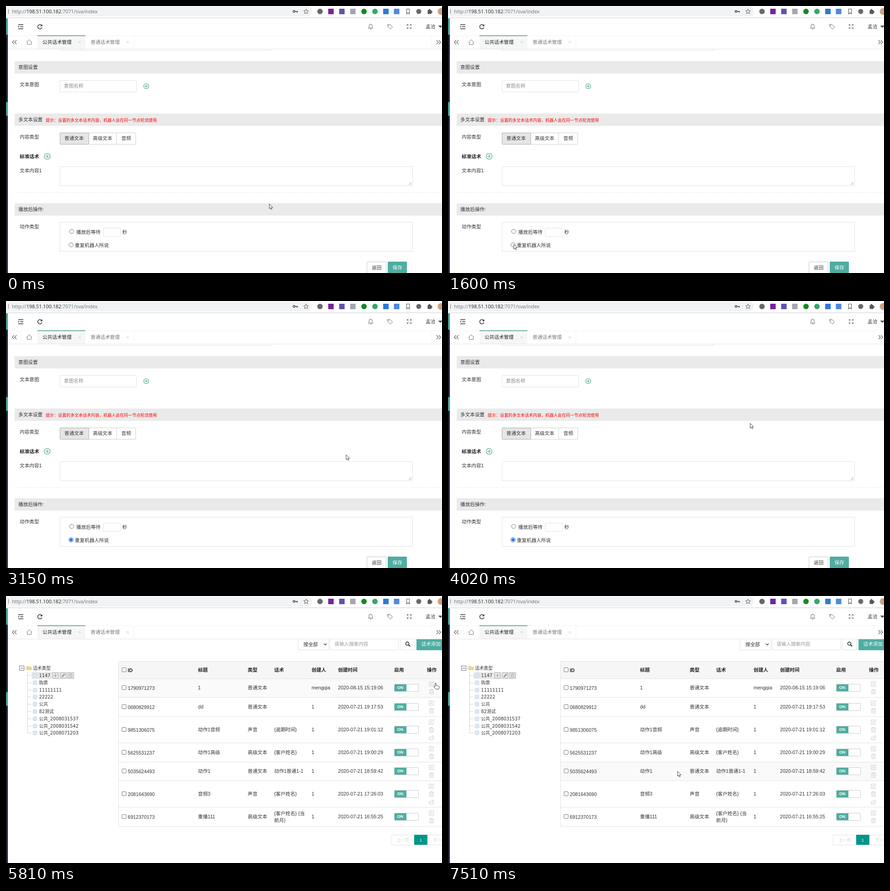
Write an HTML page that moves like this. It is 956 by 586 pixels and loops after 8000 ms.

```html
<!DOCTYPE html>
<html lang="zh-CN">
<head>
<meta charset="utf-8">
<style>
html, body { margin: 0; width: 100%; height: 100%; overflow: hidden; background: #fff; }
svg { display: block; }
text { font: 10.65px "Liberation Sans", "Noto Sans CJK SC", "Noto Sans CJK", sans-serif; white-space: pre; }
.url { font: 10.8px "Open Sans", sans-serif; }
.tree { font: 9.75px "DejaVu Sans", "Noto Sans CJK SC", "Noto Sans CJK", sans-serif; }
.small { font-size: 9.04px; }
.bold { font-weight: 700; }
</style>
</head>
<body>
<svg id="stage" width="956" height="586" viewBox="0 0 956 586"></svg>
<script>
const TEAL = '#4fada2', DARK = '#333', LINE = '#e2e2e2';

const rect = (x, y, w, h, fill = 'none', stroke = 'none', rx = 0) =>
  `<rect x="${x}" y="${y}" width="${w}" height="${h}" fill="${fill}" stroke="${stroke}" rx="${rx}"/>`;
// Outlined box aligned to whole pixels
const box = (x, y, w, h, stroke = LINE, fill = '#fff', rx = 1.5) =>
  rect(x + .5, y + .5, w - 1, h - 1, fill, stroke, rx);
const path = (d, stroke = DARK, width = 1, fill = 'none') =>
  `<path d="${d}" stroke="${stroke}" stroke-width="${width}" fill="${fill}"/>`;
const dots = d => `<path d="${d}" stroke="#aaa" stroke-dasharray="1 1"/>`;
const circle = (x, y, r, fill, stroke = 'none', width = 1) =>
  `<circle cx="${x}" cy="${y}" r="${r}" fill="${fill}" stroke="${stroke}" stroke-width="${width}"/>`;
// y is the middle of the line of text; baselines sit on whole pixels
const text = (x, y, s, fill = DARK, cls = '', anchor = 'start') =>
  `<text x="${x}" y="${Math.round(y + 4)}" fill="${fill}" class="${cls}" text-anchor="${anchor}">${s}</text>`;
const at = (x, y, s) => `<g transform="translate(${x} ${y})">${s}</g>`;
const group = (id, s) => `<g id="${id}">${s}</g>`;
const plus = (x, y, r) => circle(x, y, r, '#fff', '#3f9c90', 1.1) +
  path(`M${x - r * .6} ${y}h${r * 1.2}M${x} ${y - r * .6}v${r * 1.2}`, '#3f9c90', 1.1);
const cross = x => path(`M${x - 2.5} 77l5 5m0-5l-5 5`, '#c4c4c4', .9);

function browserBar() {
  const square = (x, fill) => rect(x - 6, 6, 12, 12, fill);
  return rect(0, 0, 956, 27, '#fff') + rect(-20, 1, 691, 22, '#f1f3f4', 'none', 11) +
    rect(0, 25, 956, 1, '#d9dbdd') + rect(0, 26, 956, 1, '#eee') + path('M5.5 7v10', '#777') +
    `<text x="13" y="16" class="url" fill="#6b7075">http://<tspan fill="#222">198.51.100.182</tspan>:7071/sva/index</text>` +
    circle(631.5, 11.8, 2, 'none', '#55595e', 1.7) + path('M634 11.8h6M638.3 12v2.6', '#55595e', 1.8) +
    path('M658 6.7l1.5 3.5 3.8.3-2.9 2.5.9 3.7-3.3-2-3.3 2 .9-3.7-2.9-2.5 3.8-.3z', '#55595e') +
    circle(688.5, 12, 6, '#666a6e') + square(712.5, '#7a1fa0') + square(736.5, '#6650b0') +
    square(760.5, '#a5a8ab') + circle(785, 12, 6, '#128a22') + circle(809, 12, 6, '#35a66a') +
    square(833, '#2b7bd8') + square(856.5, '#5088dc') +
    path('M878.5 6.5h6v11l-3-2.6-3 2.6z', '#55595e', 1.2) + circle(905, 12, 5.5, '#66696d') +
    rect(924.5, 9, 8.5, 8.5, '#55595e', 'none', 1) + circle(928.5, 8.5, 2, '#55595e') +
    circle(933, 13, 2, '#55595e') + circle(954, 12, 7.5, '#d0a27c');
}

function header() {
  const grey = '#666';
  return rect(0, 27, 956, 68, '#fff') + browserBar() +
    path('M27 41h11M31 45.5h7M27 50h11', DARK, 1.4) + path('M27 43.5v4l2.4-2z', 'none', 0, DARK) +
    path('M78.3 43a4.7 4.7 0 1 0 .5 4', DARK, 1.5) + path('M79.6 40v4.5h-4.5z', 'none', 0, DARK) +
    path('M794.5 48.5h10l-1.5-2v-3a3.5 3.5 0 0 0-7 0v3zM798 50.5h3.5M799.5 39v1', grey) +
    path('M836.5 40.5l5-.3 6 6-4.6 4.6-6-6z', grey) + circle(839.3, 43, .9, grey) +
    path('M879.5 43.5v-3h3M885.5 40.5h3v3M888.5 46.5v3h-3M882.5 49.5h-3v-3M880 41l2.8 2.8M888 41l-2.8 2.8M888 49l-2.8-2.8M880 49l2.8-2.8', grey) +
    text(920, 45, '孟洽') + path('M947.5 43h10l-5 5z', 'none', 0, '#555') +
    rect(0, 65, 956, 1, '#f4f4f4') +
    path('M18 75l-4 4.5 4 4.5M23 75l-4 4.5 4 4.5M944 75l4 4.5-4 4.5M949 75l4 4.5-4 4.5', DARK, 1.1) +
    path('M45 79.5l6-5.5 6 5.5M46.7 78.5v6h8.6v-6', '#777') +
    rect(33, 66, 1, 28, '#f3f3f3') + rect(280, 66, 1, 28, '#f3f3f3') + rect(933, 66, 1, 28, '#f3f3f3') +
    rect(69, 65, 105, 29, '#f6f6f6') + rect(69, 64.5, 105, 1.5, '#4a968d') +
    text(80, 79, '公共话术管理', '#222') + cross(161.5) +
    text(185.5, 79, '普通话术管理', '#777') + cross(267) + rect(0, 94, 956, 1, '#e4e4e4') +
    rect(0, 27, 4, 559, '#1e2029') + rect(0, 27, 4, 36, '#489d92') + rect(0, 211, 4, 30, '#489d92');
}

function form() {
  const bar = (y, s) => rect(19, y, 937, 27, '#eaeaea') + text(27, y + 13.4, s);
  return rect(0, 95, 956, 491, '#fff') + box(118, 80, 465, 18) +
    bar(121, '意图设置') + text(30, 172, '文本意图') + box(118, 163, 169, 26) +
    text(127, 175, '意图名称', '#8c8c8c') + plus(307.5, 176, 5.5) +
    bar(236, '多文本设置') + text(87, 250, '提示：设置的多文本话术内容，机器人会在同一节点轮流使用', '#f00', 'small') +
    text(30, 287, '内容类型') + box(118, 278, 167, 26, '#d0d0d0') + rect(242, 278, 1, 25, '#d0d0d0') +
    box(118, 278, 64, 26, '#adadad', '#e6e6e6') +
    text(128, 290, '普通文本') + text(190.5, 290, '高级文本') + text(253, 290, '音频') +
    text(30, 330, '标准话术', '#222', 'bold') + plus(90.3, 330, 6.5) +
    text(30, 361, '文本内容1') + box(118, 352, 774, 43) + path('M883 392.5l6-6M886.5 392.5l2.5-2.5', '#777', .8) +
    `<path d="M19 409.5H956" stroke="#e8e8e8" stroke-dasharray="3 2"/>` +
    bar(433, '播放后操作:') + text(30, 484, '动作类型') + box(118, 474, 774, 65, LINE, '#fff', 0) +
    circle(144, 494.7, 4.6, '#fff', '#757575') + text(154, 496, '播放后等待') +
    box(213, 487, 39, 19) + text(255, 496, '秒') +
    circle(142.7, 524.2, 4.6, '#fff', '#757575') +
    group('checked', circle(142.7, 524.2, 4.6, '#fff', '#0b6fe0', 1.1) + circle(142.7, 524.2, 2.9, '#0b6fe0')) +
    text(151, 525, '重复机器人所说') +
    box(791, 561, 43, 30, '#c9c9c9') + text(802, 574, '返回') +
    group('save', rect(837, 561, 42, 30, TEAL, 'none', 1.5) + text(847.5, 574, '保存', '#fff'));
}

const edges = [181, 222, 264, 322, 364, 405, 463, 505];
const rows = [
  ['1790971273', '1', '普通文本', '', 'mengqia', '2020-08-15 15:19:06'],
  ['0680829912', 'dd', '普通文本', '', '1', '2020-07-21 19:17:53'],
  ['9851306075', '动作1音频', '声音', '{逾期时间}', '1', '2020-07-21 19:01:12'],
  ['5625531237', '动作1高级', '高级文本', '{客户姓名}', '1', '2020-07-21 19:00:29'],
  ['5035624493', '动作1', '普通文本', '动作1普通1-1', '1', '2020-07-21 18:59:42'],
  ['2081643690', '音频3', '声音', '{客户姓名}', '1', '2020-07-21 17:26:03'],
  ['6912370173', '重播111', '高级文本', '{客户姓名} {当|前月}', '1', '2020-07-21 16:55:25']
];
const columns = [267, 421, 530, 588, 670, 728];
const trash = c => path('M-5 -3.5h10M-2 -3.5v-1.5h4v1.5M-4 -3.5v8.5h8v-8.5M-1.3 -1v4M1.3 -1v4', c, .9);
const icons = [
  path('M1 -4.5h-6v9.5h9.5v-5M-2 2l.6-2.4 5.6-5.3 1.7 1.7-5.6 5.4z', '#c4c4c4', .9),
  trash('#c4c4c4'),
  path('M-3.500 -1h-1.500v6h8.500v-2.500M-3 2.500c0-3 2-4.500 5-4.500v-2.500l4 3.500-4 3.500v-2.200', '#c4c4c4', .9)
];
const check = y => box(254, y - 5, 10, 10, '#777', '#fff', 1.5);

function tableRow(cells, i) {
  const c = Math.floor((edges[i] + edges[i + 1]) / 2), count = cells[1].includes('音频') ? 3 : 2;
  const lines = (s, x) => s.split('|').map((part, k, all) =>
    text(x, c + (k - (all.length - 1) / 2) * 15, part)).join('');
  return check(c) + cells.map((s, k) => k ? lines(s, columns[k]) : text(267, c + 1, s)).join('') +
    box(851, c - 8, 54, 17, '#ccc') + rect(852, c - 7, 26, 15, TEAL) +
    text(864.5, c - .6, 'ON', '#fff', 'small bold', 'middle') +
    icons.slice(0, count).map((s, k) => at(933, c + .5 + (k - (count - 1) / 2) * 17, s)).join('') +
    rect(246, edges[i + 1], 710, 1, LINE);
}

function tree() {
  const names = ['1147', '购票', '11111111', '22222', '公共', '82测试',
    '公共_2008031537', '公共_2008031542', '公共_2008071203'];
  const button = (x, s) => box(x, 168, 13, 13, '#aaa', '#eee', 0) + at(x + 6.5, 174.5, s);
  return rect(56, 167, 94, 15, '#e8e8e8') +
    button(102, path('M-4 0h8M0 -4v8', '#888')) +
    button(119, path('M-3.500 3.500l1-3 4.500-4.500 2 2-4.500 4.500z', '#888', .8, '#aaa')) +
    button(135, `<g transform="scale(.75)">${trash('#888')}</g>`) +
    dots('M47.500 166V301') +
    names.map((s, i) => {
      const y = Math.round(174 + i * 15.8);
      return dots(`M48 ${y + .5}h8`) + rect(59.5, y - 3.5, 8, 8, '#eef4fb', '#b4c6da', 1) +
        path(`M61.500 ${y - .5}h4M61.500 ${y + 2}h4`, '#a9bfd8', .8) + text(72.5, y, s, DARK, 'tree');
    }).join('');
}

function list() {
  const heads = ['ID', '标题', '类型', '话术', '创建人', '创建时间'];
  return rect(0, 95, 956, 491, '#fff') +
    box(640, 90, 68, 29) + text(652, 106, '搜全部') + path('M697 104.500l3 3 3-3', DARK, 1.3) +
    box(710, 90, 151, 29) + text(720, 105, '请输入搜索内容', '#999') +
    box(864, 90, 33, 29) + circle(880, 104.5, 3.6, 'none', '#222', 1.5) + path('M882.500 107l3.500 3.500', '#222', 1.9) +
    rect(900, 90, 70, 29, TEAL, 'none', 1.5) + text(910.5, 105, '话术添加', '#fff') +
    rect(246, 143, 710, 38, '#f6f6f6') + rect(246, 143, 710, 1, LINE) + rect(246, 181, 710, 1, LINE) +
    check(162) + heads.map((s, i) => text(columns[i], i ? 162 : 163, s, '#222', 'bold')).join('') +
    text(851, 162, '启用', '#222', 'bold') + text(923, 162, '操作', '#222', 'bold') +
    group('hover', rect(246, 0, 710, 1, '#fafafa')) +
    rows.map(tableRow).join('') + rect(246, 143, 1, 363, LINE) +
    box(844, 524, 130, 23, LINE, '#fff', 0) + rect(895, 524, 29, 22, '#009688') +
    text(856.5, 535, '上一页', '#ccc', 'small') + text(909.5, 535, '1', '#fff', 'small', 'middle') +
    text(936, 535, '下一页', '#ccc', 'small') +
    box(29, 153, 11, 11, '#777', '#fff', 0) + path('M31.500 158.500h6', '#555') + dots('M41 158.500h5') +
    path('M45.500 154.500h4l1 1.500h5v6h-10z', '#d9bd68', .8, '#efd583') +
    text(59, 158, '话术类型', DARK, 'tree') +
    group('sliver', rect(47, 166, 104, 1, '#e0e0e0')) + group('tree', tree());
}

const arrow = path('M0 0V10.500L2.500 8.300 4.200 12 5.800 11.300 4.200 7.700H7.600Z', '#333', .9, '#fff');
const hand = path('M-1.200 0.600a1.200 1.200 0 0 1 2.400 0V5q2.200-.8 2.600.6 2-.6 2.500.8 1.700-.3 1.700 1.400 0 3-1.500 5.200H0.500L-3.600 8.300q-.6-1.700 1-1.600l1.400 1z', '#333', .9, '#fff');

const stage = document.getElementById('stage');
stage.innerHTML = group('form', form()) + group('list', list()) + header() +
  group('cursor', group('arrow', arrow) + group('hand', hand));
const el = id => document.getElementById(id);
const show = (id, on) => { el(id).style.display = on ? '' : 'none'; };

// Pointer moves: start, end, steps, x, y, optional bend point
const moves = [
  [210, 290, 2, 584, 428], [440, 1220, 11, 164, 527, 300, 560], [1290, 1600, 5, 143.5, 522.5],
  [1770, 1840, 2, 144, 520], [2000, 2530, 8, 847, 558], [2600, 2690, 2, 852, 567],
  [3070, 3230, 3, 721, 285], [3630, 3700, 2, 664, 269], [3870, 4020, 3, 662, 268],
  [4970, 5660, 10, 945, 190], [5810, 5810, 1, 941.5, 191], [5890, 5970, 2, 932, 195],
  [6120, 6120, 1, 932, 196], [6430, 6510, 2, 927, 188], [6660, 6900, 4, 607, 380],
  [7050, 7510, 7, 503, 384.5, 560, 389]
];

function pointer(t) {
  let x = 577, y = 434;
  for (const [start, end, n, tx, ty, bx = (x + tx) / 2, by = (y + ty) / 2] of moves) {
    if (t < start) break;
    const gap = (end - start) / (n - 1) || 1;
    const k = Math.min(1, (Math.floor((t - start) / gap + .2) + 1) / n);
    const s = k * (2 - k) * .5 + k * k * (3 - 2 * k) * .5, q = 1 - s;
    x = q * q * x + 2 * q * s * bx + s * s * tx;
    y = q * q * y + 2 * q * s * by + s * s * ty;
  }
  return [x, y];
}

function draw(t) {
  const [x, y] = pointer(t), listed = t >= 4510;
  const overSave = t >= 2600 && t < 3070;
  const pointing = overSave || (t >= 5660 && t < 6660);
  show('form', !listed);
  show('list', listed);
  show('checked', t >= 1770);
  show('tree', t >= 4970);
  show('sliver', t < 4970);
  el('save').setAttribute('opacity', overSave ? (t < 2920 ? .8 : .9) : 1);
  const row = edges.findIndex((top, i) => y >= top && y < edges[i + 1]);
  show('hover', row >= 0);
  if (row >= 0) {
    const mark = el('hover').firstChild;
    mark.setAttribute('y', edges[row] + 1);
    mark.setAttribute('height', edges[row + 1] - edges[row] - 1);
  }
  show('arrow', !pointing);
  show('hand', pointing);
  el('cursor').setAttribute('transform', `translate(${x + .5} ${y + .5})`);
}

const begin = performance.now();
function tick() {
  draw((performance.now() - begin) % 8000);
  requestAnimationFrame(tick);
}
tick();
</script>
</body>
</html>
```
